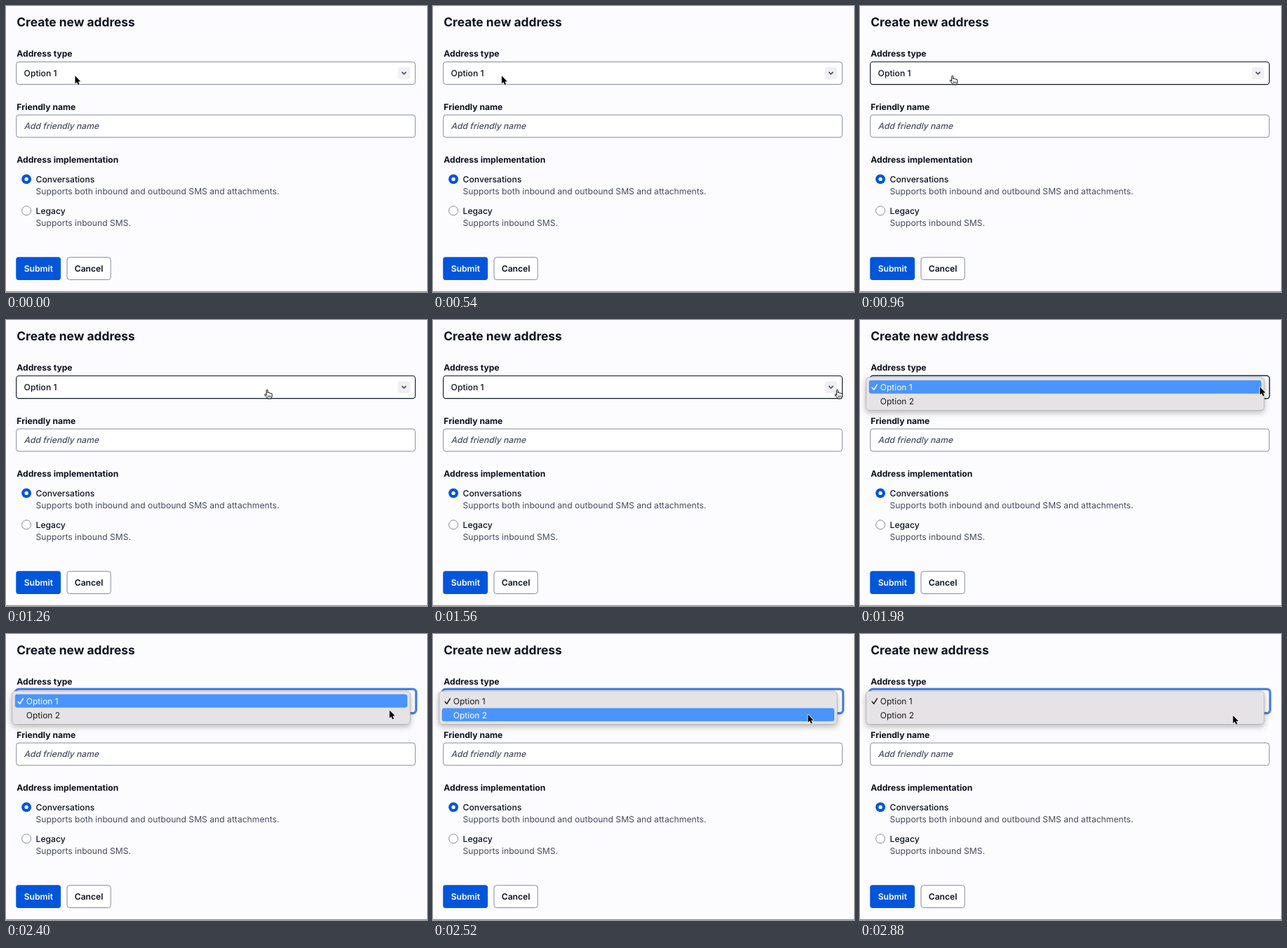
Write an HTML page that moves like this. It is 600 px wide and 407 px high and loops after 3000 ms.

```html
<!DOCTYPE html>
<html lang="en">
<head>
<meta charset="utf-8">
<title>Create new address</title>
<style>
  html, body { margin: 0; width: 100%; height: 100%; overflow: hidden; background: #fcfbfe; }
  svg { display: block; width: 100%; height: 100%; }
  text { font: 400 12.13px Inter, sans-serif; fill: #0e1320; text-rendering: geometricPrecision; }
  .title { font-size: 17.33px; font-weight: 700; }
  .label { font-weight: 700; }
  .action { font-weight: 600; text-anchor: middle; }
  .name, .value { font-weight: 500; }
  .help { fill: #474d61; }
  .hint { fill: #474d61; font-weight: 500; }
  .box { fill: #fff; stroke: #858b9f; }
  #menu { filter: drop-shadow(0 3px 4px rgba(0, 0, 0, .28)); }
  #menu text { font-size: 12px; }
</style>
</head>
<body>
<svg viewBox="0 0 600 407">
  <rect width="600" height="407" fill="#fcfbfe"/>
  <rect y="405.9" width="600" height="1.1" fill="#8c8c92"/>
  <text class="title" x="15.2" y="29.2">Create new address</text>

  <text class="label" x="15.3" y="72.3">Address type</text>
  <rect id="select" fill="#fff"/>
  <text class="value" x="25.6" y="99.8">Option 1</text>
  <rect x="558.6" y="87" width="17.2" height="17.2" rx="3.4" fill="#f0f0f3"/>
  <path d="M564.6 94.4l2.6 2.6 2.6-2.6" fill="none" stroke="#474d61" stroke-width="1.7" stroke-linecap="round" stroke-linejoin="round"/>

  <text class="label" x="15.3" y="147.7">Friendly name</text>
  <rect class="box" x="14.75" y="155" width="568.5" height="31.9" rx="3.6"/>
  <text class="hint" transform="translate(25.6 175.2) skewX(-14)">Add friendly name</text>

  <text class="label" x="15.3" y="223.2">Address implementation</text>
  <circle cx="29.1" cy="246.4" r="6.95" fill="#0056da"/>
  <circle cx="29.1" cy="246.4" r="2.6" fill="#fff"/>
  <text class="name" x="42.6" y="250.8">Conversations</text>
  <text class="help" x="42.6" y="268.1">Supports both inbound and outbound SMS and attachments.</text>
  <circle class="box" cx="29.1" cy="291.3" r="6.5"/>
  <text class="name" x="42.6" y="295.6">Legacy</text>
  <text class="help" x="42.6" y="312.8">Supports inbound SMS.</text>

  <rect x="14.25" y="357.2" width="63.8" height="32.7" rx="3.6" fill="#0056da"/>
  <text class="action" x="46.3" y="377.8" style="fill:#fff">Submit</text>
  <rect class="box" x="87" y="357.7" width="62.2" height="31.8" rx="3.6"/>
  <text class="action" x="118.1" y="377.8">Cancel</text>

  <g id="menu">
    <rect x="8.6" y="81.2" width="567.4" height="47.4" rx="5" fill="#e5e3e5" stroke="#aaa8aa" stroke-width=".7"/>
    <rect id="highlight" x="12.8" width="559.2" height="18.9" rx="3.4" fill="#4a94fd"/>
    <path id="check" d="M17.2 96.2l2.5 3.1 4.6-7.3" fill="none" stroke-width="1.5" stroke-linecap="round" stroke-linejoin="round"/>
    <text id="item1" x="28.8" y="99.8">Option 1</text>
    <text id="item2" x="28.8" y="119.5">Option 2</text>
  </g>

  <g id="pointer">
    <path id="arrow" d="M0 .3V11.6L2.5 9.2 4.3 13.2 6.2 12.4 4.5 8.4H7.9Z" fill="#000" stroke="#fff" stroke-width="1.4" stroke-linejoin="round" paint-order="stroke"/>
    <g id="hand" transform="translate(-4.2 -.6)" stroke="#000" stroke-linecap="round" stroke-linejoin="round">
      <path fill="#fff" d="M3.2 8.3V1.9C3.2.3 5.2.3 5.3 1.9V5.2C5.6 4.3 7.3 4.4 7.4 5.6 7.8 4.8 9.3 5 9.4 6.1 9.9 5.5 11.3 5.8 11.3 7V9.3C11.3 11 10.4 11.7 10.2 13.3H4.8C4.6 12 2.2 9.8.9 8.2.3 7.2 1.6 6.4 2.4 7.3Z"/>
      <path fill="none" stroke-width=".7" d="M5.6 9.2v2.1M7.2 9.2v2.1M8.8 9.2v2.1"/>
    </g>
  </g>
</svg>
<script>
const LOOP = 3000, STEP = 60;
const HOVER = 600, HAND = 660, OPEN = 1920, NEXT_ITEM = 2460, BLINK = 2820;

// Pointer hot spot: time, x, y
const path = [
  [0, 98.5, 99], [540, 97.9, 99], [660, 99, 99], [960, 131.7, 99.1], [1140, 245, 99.2],
  [1320, 430, 99.2], [1560, 576.2, 99.2], [1740, 576, 98.6], [1980, 570, 95],
  [2160, 565, 97.5], [2400, 546.6, 108.2], [2580, 531.6, 115.6], [3000, 531.6, 115.6]
];

const $ = id => document.getElementById(id);
const set = (id, attrs) => {
  for (const key in attrs) $(id).setAttribute(key, attrs[key]);
};
const show = (id, on) => set(id, { visibility: on ? "visible" : "hidden" });
const clamp = v => Math.max(0, Math.min(1, v));
const mix = (a, b, p) => a + (b - a) * p;
const mixColor = (a, b, p) => `rgb(${a.map((v, i) => Math.round(mix(v, b[i], p)))})`;

// Slope at a key; zero where the motion rests or turns back
function slope(i, axis) {
  const a = path[i - 1], b = path[i], c = path[i + 1];
  if (!a || !c || (b[axis] - a[axis]) * (c[axis] - b[axis]) <= 0) return 0;
  const before = (b[axis] - a[axis]) / (b[0] - a[0]);
  const after = (c[axis] - b[axis]) / (c[0] - b[0]);
  return 2 * before * after / (before + after);
}

function pointerAt(t, axis) {
  const i = path.findIndex((key, n) => n + 1 === path.length - 1 || t < path[n + 1][0]);
  const a = path[i], b = path[i + 1], span = b[0] - a[0];
  const p = (t - a[0]) / span, q = 1 - p;
  return a[axis] * q * q * (1 + 2 * p) + b[axis] * p * p * (1 + 2 * q)
    + span * p * q * (slope(i, axis) * q - slope(i + 1, axis) * p);
}

function drawSelect(t) {
  const gray = [133, 139, 159], ink = [18, 24, 42], blue = [76, 131, 226];
  const hover = t < HOVER ? 0 : clamp((t - HOVER + 60) / 120);
  const focus = clamp((t - OPEN - 30) / 150);
  const w = mix(mix(1, 1.15, hover), 3.4, focus);
  set("select", {
    x: 15.25 - w / 2, y: 80.1 - w / 2, width: 567.5 + w, height: 30.9 + w, rx: 3.1 + w / 2,
    "stroke-width": w,
    stroke: focus ? mixColor(ink, blue, focus) : mixColor(gray, ink, hover)
  });
}

function drawMenu(t) {
  const open = t >= OPEN, first = t < NEXT_ITEM, lit = t < BLINK;
  const ink = on => on ? "#fff" : "#1c1b1d";
  show("menu", open);
  show("highlight", open && lit);
  set("highlight", { y: first ? 85.8 : 105.4 });
  set("check", { stroke: ink(first) });
  $("item1").style.fill = ink(first);
  $("item2").style.fill = ink(!first && lit);
}

function drawPointer(t) {
  const hand = t >= HAND && t < OPEN;
  show("hand", hand);
  show("arrow", !hand);
  set("pointer", { transform: `translate(${pointerAt(t, 1)} ${pointerAt(t, 2)})` });
}

function render(time) {
  const t = Math.floor((time % LOOP) / STEP) * STEP;
  drawSelect(t);
  drawMenu(t);
  drawPointer(t);
}

const start = performance.now();
function tick() {
  render(performance.now() - start);
  requestAnimationFrame(tick);
}
tick();
</script>
</body>
</html>
```
